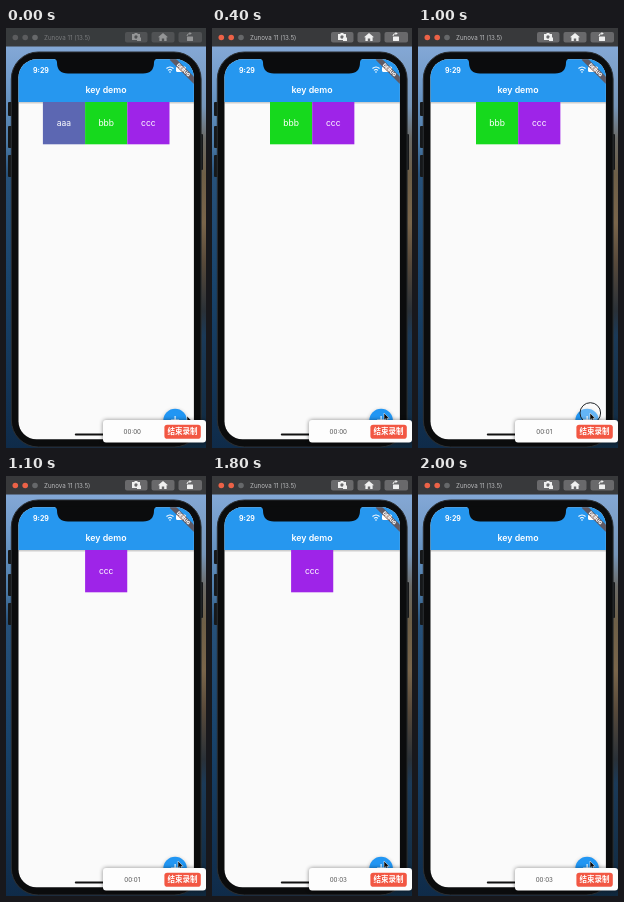
Write an HTML page that moves like this. It is 200 by 420 pixels and loops after 2100 ms.

```html
<!DOCTYPE html>
<html lang="en">
<head>
<meta charset="utf-8">
<title>key demo</title>
<style>
  html, body { margin: 0; width: 100%; height: 100%; overflow: hidden; background: #10202d; }
  svg { display: block; width: 200px; height: 420px; }
  text { font-family: Inter, Roboto, sans-serif; fill: #fff; }
  .mid { text-anchor: middle; }
  .label { font: 8.5px Inter, sans-serif; }
  .timer { font: 6.2px Inter, sans-serif; fill: #555; }

  .step { animation: 2100ms step-end infinite; }
  .bar { animation-name: bar; }
  .dim { animation-name: dim; }
  .dot { animation-name: dot; }
  .aaa { animation-name: aaa; }
  .bbb { animation-name: bbb; }
  .ccc { animation-name: ccc; }
  .ring { animation-name: ring; }
  .cursor { animation-name: cursor; }
  .s0 { animation-name: s0; }
  .s1 { animation-name: s1; }
  .s2 { animation-name: s2; }
  .s3 { animation-name: s3; }

  /* window gains focus */
  @keyframes bar { 0% { fill: #383b3d; } 19.04% { fill: #38393b; } }
  @keyframes dim { 0% { opacity: .5; } 19.04% { opacity: 1; } }
  @keyframes dot { 0% { fill: #5b5c5e; } 19.04% { fill: #ec6247; } }

  /* each press removes the first tile and recentres the rest */
  @keyframes aaa { 0% { visibility: visible; } 19.04% { visibility: hidden; } }
  @keyframes bbb {
    0% { transform: none; visibility: visible; }
    19.04% { transform: translateX(-21.1px); visibility: visible; }
    52.38% { visibility: hidden; }
  }
  @keyframes ccc {
    0% { transform: none; visibility: visible; }
    19.04% { transform: translateX(-21.1px); visibility: visible; }
    52.38% { transform: translateX(-42.2px); visibility: visible; }
    95.23% { visibility: hidden; }
  }
  @keyframes ring {
    0%, 19.04%, 52.38%, 95.23% { visibility: hidden; }
    14.28%, 47.61%, 90.47% { visibility: visible; }
  }
  @keyframes cursor {
    0% { transform: translate(181px, 388px); }
    4.76% { transform: translate(176px, 387px); }
    9.52% { transform: translate(172px, 385px); }
  }

  @keyframes s0 { 0% { visibility: visible; } 33.33% { visibility: hidden; } }
  @keyframes s1 { 0%, 57.14% { visibility: hidden; } 33.33% { visibility: visible; } }
  @keyframes s2 { 0%, 80.95% { visibility: hidden; } 57.14% { visibility: visible; } }
  @keyframes s3 { 0% { visibility: hidden; } 80.95% { visibility: visible; } }
</style>
</head>
<body>
<svg viewBox="0 0 200 420">
  <defs>
    <linearGradient id="sea" x2="0" y2="1">
      <stop offset="0" stop-color="#84a8d6"/>
      <stop offset=".1" stop-color="#6f9aca"/>
      <stop offset=".24" stop-color="#4c7ba8"/>
      <stop offset=".32" stop-color="#27517a"/>
      <stop offset=".6" stop-color="#18436b"/>
      <stop offset="1" stop-color="#0f2b49"/>
    </linearGradient>
    <linearGradient id="coast" x2="0" y2="1">
      <stop offset="0" stop-color="#84a8d6"/>
      <stop offset=".15" stop-color="#7595b8"/>
      <stop offset=".23" stop-color="#6b6a66"/>
      <stop offset=".32" stop-color="#6e5f47"/>
      <stop offset=".44" stop-color="#79654a"/>
      <stop offset=".54" stop-color="#57493a"/>
      <stop offset=".66" stop-color="#2a3138"/>
      <stop offset=".72" stop-color="#1b3a58"/>
      <stop offset="1" stop-color="#10293f"/>
    </linearGradient>
    <linearGradient id="shade" x2="0" y2="1">
      <stop offset="0" stop-color="#000" stop-opacity=".22"/>
      <stop offset="1" stop-color="#000" stop-opacity="0"/>
    </linearGradient>
    <filter id="soft" x="-20%" y="-50%" width="140%" height="200%">
      <feGaussianBlur stdDeviation="2"/>
    </filter>
    <clipPath id="screen"><rect x="12.5" y="31.3" width="175.4" height="380" rx="18"/></clipPath>
  </defs>

  <rect y="18" width="100" height="402" fill="url(#sea)"/>
  <rect x="100" y="18" width="100" height="402" fill="url(#coast)"/>

  <!-- window bar -->
  <rect class="step bar" width="200" height="18.5" fill="#38393b"/>
  <circle class="step dot" cx="9.3" cy="9.5" r="2.8" fill="#ec6247"/>
  <circle class="step dot" cx="19.2" cy="9.5" r="2.8" fill="#ec6247"/>
  <circle cx="29" cy="9.5" r="2.8" fill="#66686a"/>
  <g class="step dim">
    <text x="38" y="12" font-size="6.2" style="fill:#b9babc">Zunova 11 (13.5)</text>
    <g fill="#69696b">
      <rect x="119" y="4" width="22.5" height="10.5" rx="2"/>
      <rect x="145.5" y="4" width="23" height="10.5" rx="2"/>
      <rect x="172.5" y="4" width="23.5" height="10.5" rx="2"/>
    </g>
    <g fill="#f0f0f0">
      <path d="M126 6h2l1-1h2l1 1h2v6h-8z"/>
      <circle cx="130" cy="9" r="1.7" fill="#69696b"/>
      <rect x="131" y="9.5" width="4" height="3.5"/>
      <path d="M152 9.3l5-4.3 5 4.3h-1.4v3.7h-2.4v-2.5h-2.4V13h-2.4V9.3z"/>
      <rect x="181" y="8.5" width="6" height="4.5" rx=".5"/>
      <path d="M181 8q0-2.5 3-2.5" fill="none" stroke="#f0f0f0"/>
      <path d="M183.5 4l2.3 1.5-2.3 1.5z"/>
    </g>
  </g>

  <!-- phone -->
  <g fill="#16181a">
    <rect x="2" y="74" width="5" height="14" rx="1"/>
    <rect x="2" y="98" width="5" height="22" rx="1"/>
    <rect x="2" y="127" width="5" height="22" rx="1"/>
    <rect x="193" y="106" width="4" height="36" rx="1"/>
  </g>
  <rect x="5.3" y="24" width="189.8" height="395" rx="27" fill="#0b0c0d" stroke="#2c2f32"/>

  <g clip-path="url(#screen)">
    <rect x="12" y="31" width="177" height="383" fill="#fafafa"/>
    <rect x="12" y="74" width="177" height="2.5" fill="url(#shade)"/>
    <rect x="12" y="31" width="177" height="43" fill="#2697ef"/>
    <text class="mid" x="100" y="65" font-size="8.8" font-weight="600">key demo</text>
    <text x="27" y="44.5" font-size="7" font-weight="700">9:29</text>
    <path d="M160.5 40.5q3.5-3 7 0M162 42.3q2-1.7 4 0" fill="none" stroke="#fff" stroke-width="1.1"/>
    <circle cx="164" cy="44" r=".8" fill="#fff"/>
    <rect x="170" y="38.5" width="10" height="5.5" rx="1.5" fill="#fff"/>
    <g transform="translate(177.5 42) rotate(45)">
      <rect x="-17" y="-2.6" width="34" height="5.2" fill="#6d4a40" opacity=".8"/>
      <text class="mid" y="1.7" font-size="4.8" font-weight="900">DEBUG</text>
    </g>

    <g class="step aaa">
      <rect x="36.9" y="74" width="42.2" height="42.3" fill="#5c67b2"/>
      <text class="mid label" x="58" y="98">aaa</text>
    </g>
    <g class="step bbb">
      <rect x="79.1" y="74" width="42.2" height="42.3" fill="#16d91d"/>
      <text class="mid label" x="100.2" y="98">bbb</text>
    </g>
    <g class="step ccc">
      <rect x="121.3" y="74" width="42.2" height="42.3" fill="#9e24e8"/>
      <text class="mid label" x="142.4" y="98">ccc</text>
    </g>

    <circle cx="169.1" cy="394" r="11.8" fill="#000" opacity=".3" filter="url(#soft)"/>
    <circle cx="169.1" cy="392.6" r="11.8" fill="#2196f3"/>
    <path d="M165.1 392h8M169.1 388v8" stroke="#fff" stroke-width="1.1"/>
    <rect x="68.8" y="405.5" width="62" height="2" rx="1" fill="#111"/>
  </g>
  <path d="M47 30.5q4 .5 4 4 0 11 11 11h75q11 0 11-11 0-3.5 4-4z" fill="#0b0c0d"/>

  <!-- pointer -->
  <circle class="step ring" cx="172.3" cy="385" r="10.3" fill="#fff" fill-opacity=".3" stroke="#202428" stroke-width="1"/>
  <path class="step cursor" d="M0 0v7.2l1.7-1.5 1.2 2.7 1.2-.6-1.2-2.5h2.3z" fill="#0b0b0b" stroke="#fff" stroke-width=".5"/>

  <!-- recorder -->
  <rect x="97" y="392" width="104" height="23" rx="3" fill="#000" opacity=".45" filter="url(#soft)"/>
  <rect x="97" y="392" width="103" height="22.6" rx="3" fill="#fdfdfd"/>
  <g class="mid">
    <text class="timer step s0" x="126.3" y="406">00:00</text>
    <text class="timer step s1" x="126.3" y="406">00:01</text>
    <text class="timer step s2" x="126.3" y="406">00:02</text>
    <text class="timer step s3" x="126.3" y="406">00:03</text>
  </g>
  <rect x="158.4" y="396.7" width="36.4" height="14" rx="2.8" fill="#f25743"/>
  <text class="mid" x="176.6" y="406.4" style="font:bold 7.5px 'Noto Sans CJK SC','Noto Sans CJK',sans-serif" lang="zh-CN">结束录制</text>
</svg>
</body>
</html>
```
